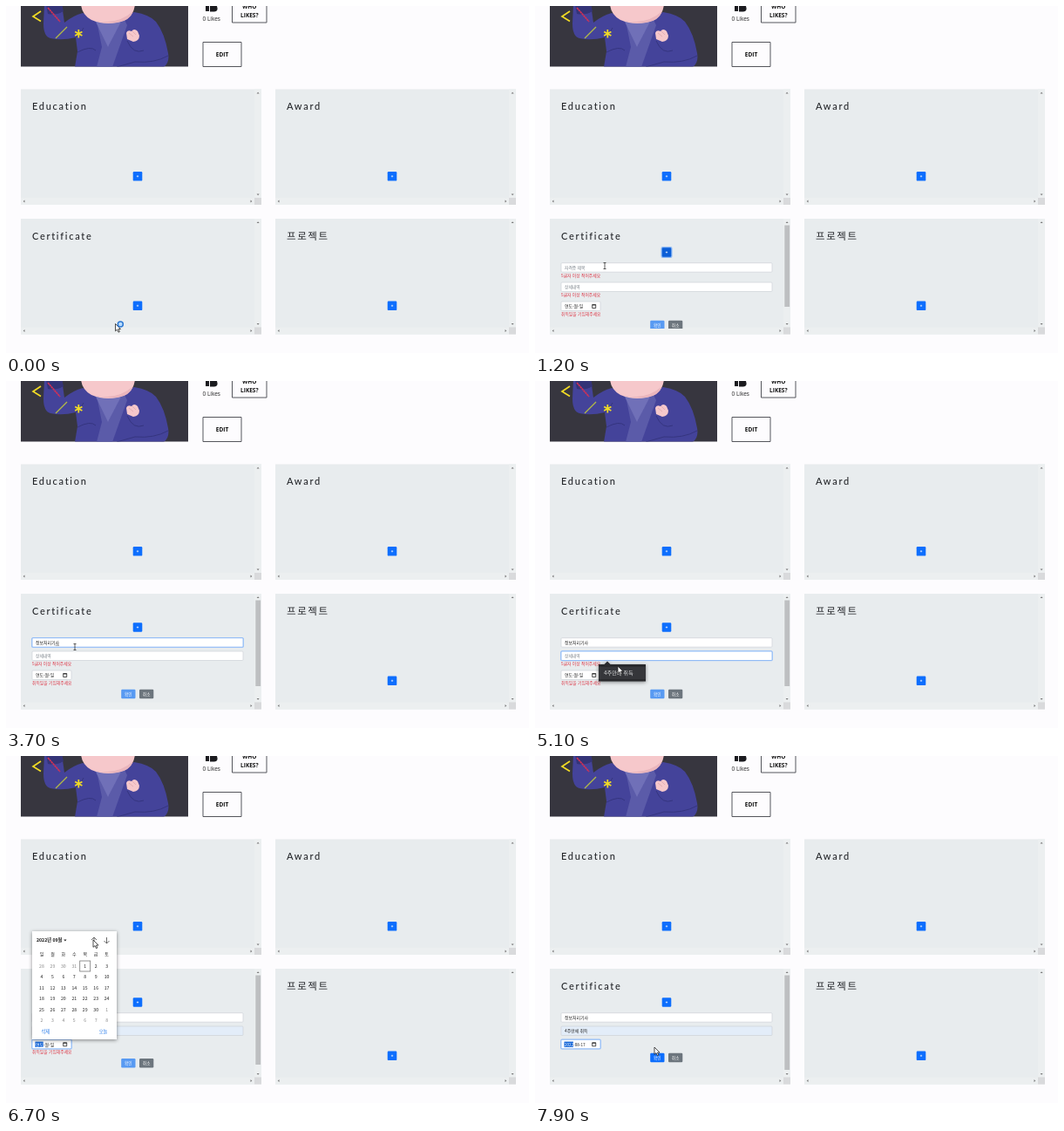
Write an HTML page that moves like this. It is 600x398 px and loops after 8 s.

```html
<!DOCTYPE html>
<html lang="ko">
<head>
<meta charset="utf-8">
<title>Portfolio form</title>
<style>
html, body { margin: 0; width: 100%; height: 100%; overflow: hidden; background: #fdfcfe; }
svg { display: block; width: 600px; height: 398px; }
text { font-family: "Noto Sans CJK KR", "Noto Sans CJK", sans-serif; fill: #222; white-space: pre; }
.title { font: 500 11px Lato, sans-serif; letter-spacing: 1.7px; fill: #25272b; }
.ko { font-size: 11.5px; letter-spacing: 1.6px; }
.ui { font-family: "Open Sans", sans-serif; font-size: 6.5px; }
.bold { font-weight: 700; fill: #111; }
.pop { filter: drop-shadow(0 1px 2px rgba(0,0,0,.45)); }
</style>
</head>
<body>
<svg viewBox="0 0 600 398">
  <defs>
    <clipPath id="photo"><path d="M17 0H209V69.5H17z"/></clipPath>
    <clipPath id="form"><path d="M17 244H286V370H17z"/></clipPath>
    <clipPath id="days"><path d="M30 233.5H127V309H30z"/></clipPath>
  </defs>
  <rect width="600" height="398" fill="#fdfcfe"/>
  <g clip-path="url(#photo)">
    <rect x="17" width="192" height="70" fill="#37363f"/>
    <path d="M44-2L43 20Q43 35 51 37Q64 40 80 36L82 52L79 70H181Q188 65 186 54Q182 31 172 18Q165 10 147 7L118 20L88 8Q77 11 67 19L64-2Z" fill="#44439a"/>
    <path d="M46-2L48 9Q58 11 66 6L64-2Z" fill="#343477"/>
    <path d="M103 12L118 45L134 12L139 22L122 70H104L110 47Z" fill="#5b5ba9"/>
    <path d="M101 14L117 47L134 14Z" fill="#7070b8"/>
    <path d="M80 36Q86 32 89 25M82 53Q97 45 103 51M186 57Q170 66 148 64L127 70M139 40Q146 56 158 51" fill="none" stroke="#35357f"/>
    <path d="M86-2Q87 10 98 16Q117 24 137 16Q147 10 148-2Z" fill="#f6c8cb"/>
    <path d="M88 5Q95 15 109 18Q130 20 146 6Q142 17 128 19Q101 22 88 5Z" fill="#eab5bc"/>
    <path d="M138 31Q139 27 144 29Q147 25 151 29L153 34Q153 40 146 41L139 38Z" fill="#f6c8cb"/>
    <path d="M141 31L146 35M145 29L149 33" stroke="#dca5ad" stroke-width=".7"/>
    <g fill="none" stroke-width="1.7">
      <path d="M40 6L31 12L40 17.500M83.300 27V36.500M79.200 29.400L87.400 34M87.400 29.400L79.200 34" stroke="#f2dc24"/>
      <path d="M48 2L62 18" stroke="#cf3157" stroke-dasharray="2.500 .4"/>
      <path d="M57 37L70 24" stroke="#b3ba45" stroke-width="1.300"/>
    </g>
  </g>
  <path d="M229 0H233V6H229zM234 0H242Q244 6 239 6.500H234z" fill="#1b1b1f"/>
  <text class="ui" x="225.500" y="16.500">0 Likes</text>
  <g fill="none" stroke="#55565c"><path d="M259.500-2V19H299V-2M226 41.500H270V69.500H226z"/></g>
  <g class="ui bold" text-anchor="middle">
    <text class="ui bold" x="279.300" y="3">WHO</text>
    <text class="ui bold" x="279.300" y="13">LIKES?</text>
    <text class="ui bold" x="248" y="58">EDIT</text>
  </g>
  <g id="panels"></g>
  <g id="live"></g>
</svg>
<script>
const LOOP = 8000, STEP = 100;
const $ = id => document.getElementById(id);
const box = (x, y, w, h, fill, more = '') =>
  `<rect x="${x}" y="${y}" width="${w}" height="${h}" fill="${fill}" ${more}/>`;
const txt = (x, y, s, size = 4.9, fill = '#222', more = '') =>
  `<text x="${x}" y="${y}" style="font-size:${size}px;fill:${fill}" ${more}>${s}</text>`;
const mid = 'text-anchor="middle"';
const line = (d, color, w = 1) => `<path d="${d}" fill="none" stroke="${color}" stroke-width="${w}"/>`;

function plus(x, y, focus) {
  const ring = focus ? box(x - 6.5, y - 6.5, 13, 13, '#8db9f5', 'rx="2"') : '';
  return ring + box(x - 5.3, y - 5.3, 10.6, 10.6, focus ? '#0b5ed7' : '#0d6efd', 'rx="1.2"') +
    line(`M${x - 1.2} ${y}h2.4M${x} ${y - 1.2}v2.4`, '#fff', .6);
}

function panel(x, y, title, cls) {
  const tip = (a, b, d) => `<path d="M${x + a} ${y + b}${d}z" fill="#777"/>`;
  return box(x, y, 276, 132.5, '#e8ecee') +
    box(x + 268, y, 8, 124.5, '#eceff0') + box(x, y + 124.5, 268, 8, '#eceff0') +
    box(x + 268, y + 124.5, 8, 8, '#d9dadc') +
    tip(270.6, 5, 'h3l-1.5 -1.8') + tip(270.6, 120, 'h3l-1.5 1.8') +
    tip(4.5, 127, 'v3l-1.8 -1.5') + tip(263.5, 127, 'v3l1.8 -1.5') +
    `<text class="title ${cls}" x="${x + 13}" y="${y + 23.5}">${title}</text>`;
}

$('panels').innerHTML =
  panel(17, 95.5, 'Education', '') + panel(309, 95.5, 'Award', '') +
  panel(17, 244, 'Certificate', '') + panel(309, 244, '프로젝트', 'ko') +
  plus(151, 195.3) + plus(443, 195.3) + plus(443, 343.8);

const OPEN = 1000, FOCUS1 = 1500, NAMED = 2800, FOCUS2 = 4500, FILLED = 5400,
  PICKER = 6000, MONTH = 7000, PICKED = 7500;

// time, x, y of the pointer tip
const path = [[0, 125.5, 364.5], [300, 130, 361], [700, 149, 345], [1000, 148, 343],
  [1200, 80, 298], [1500, 80, 299], [2000, 80, 299], [2300, 79, 305], [4100, 79, 305],
  [4400, 83, 315], [4700, 83, 315], [5100, 95, 327], [5400, 96, 329], [5900, 68, 329],
  [6200, 68, 329], [6700, 100, 211], [7000, 101, 211], [7200, 83, 260], [7500, 83, 262],
  [7900, 137, 334], [8000, 138, 336]];

function pointer(t) {
  const i = path.findIndex(p => p[0] > t);
  const [a, b] = [path[i - 1], path[i]];
  const p = (t - a[0]) / (b[0] - a[0]), e = p * p * (3 - 2 * p);
  return [a[1] + (b[1] - a[1]) * e, a[2] + (b[2] - a[2]) * e];
}

function cursor(t) {
  const [x, y] = pointer(t);
  let s;
  if (t >= 1200 && t < 4800) {
    s = line('M-1.5 -3.5H1.5M0 -3.5V3.5M-1.5 3.5H1.5', '#333', .8);
  } else {
    s = '<path d="M0 0V8.300L2 6.600L3.500 9.700L4.900 9L3.400 6.100H6Z" fill="#fff" stroke="#222" stroke-width=".8"/>';
    if (t < 300) s += '<circle cx="5.800" cy=".5" r="3" fill="#b9dcff" stroke="#2d78d2" stroke-width="1.500"/>';
  }
  return `<g transform="translate(${x.toFixed(2)} ${y.toFixed(2)})">${s}</g>`;
}

// Hangul as it is composed key by key
const keys = ['ㅈ', '저', '정', '정ㅂ', '정보', '정보ㅊ', '정보처', '정보철', '정보처리', '정보처릭', '정보처리기', '정보처리깃', '정보처리기사'];
const typed = t => t < 1900 ? '' : keys[Math.min(keys.length - 1, Math.floor((t - 1900) / 100))];

function field(x, y, w, focus, fill = '#fff') {
  return (focus ? box(x - .8, y - .8, w + 1.6, 12.1, '#a9cbfa', 'rx="1.5"') : '') +
    box(x, y, w, 10.5, fill, `rx="1" stroke="${focus ? '#75a9f2' : '#cdd2d7'}" stroke-width=".7"`);
}

function dateField(t, y) {
  const focus = t >= PICKER;
  const parts = t < MONTH ? ['연도', '-월-일'] : ['2022', t < PICKED ? '-08-01' : '-08-17'];
  const w = t < MONTH ? 9.2 : 10.4;
  return field(30, y, 45, focus) +
    (focus ? box(33.5, y + 2.3, w, 6.3, '#1667d9') : '') +
    txt(34, y + 7.2, parts[0], t < MONTH ? 4.9 : 4.6, focus ? '#fff' : '#222') +
    txt(33.7 + w, y + 7.2, parts[1], t < MONTH ? 4.9 : 4.6) +
    line(`M65.700 ${y + 3.500}h4v4h-4zM65.700 ${y + 4}h4`, '#222', .8);
}

function button(x, y, label, fill) {
  return box(x, y - 5.2, 16.3, 10.4, fill, 'rx="1.2"') + txt(x + 8.15, y + 1.8, label, 4.7, '#fff', mid);
}

function form(t) {
  const named = t >= NAMED, filled = t >= FILLED, dated = t >= MONTH;
  const y2 = named ? 310 : 317, y3 = !named ? 339 : filled ? 325.3 : 332;
  const yb = !named ? 366 : !filled ? 359 : dated ? 346 : 352.3;
  const thumb = !named ? 345 : !filled ? 350 : dated ? 360 : 354;
  const error = (y, s) => txt(30, y, s, 4.8, '#dc3545');
  const short = '5글자 이상 적어주세요';
  const on1 = t >= FOCUS1 && t < FOCUS2, on2 = t >= FOCUS2 && t < PICKER;
  const name = typed(t), end = 34 + name.length * 4.51;
  let s = plus(151, 282.5, t < FOCUS1) + field(30, 294.7, 242, on1);
  s += name ? txt(34, 301.9, name) : txt(34, 301.9, '자격증 제목', 4.8, '#777f87');
  if (on1 && name) s += line(`M${end - 4.5} 303.200H${end}`, '#333', .5);
  if (on1 && t % 1000 < 500) s += line(`M${end + .3} 297.500V302.700`, '#222', .5);
  if (!named) s += error(311, short);
  s += field(30, y2, 242, on2, filled ? '#e3edf9' : '#fff');
  s += filled ? txt(34, y2 + 7.2, '4주만에 취득') : txt(34, y2 + 7.2, '상세내역', 4.8, '#777f87');
  if (!filled) s += error(y2 + 16, short);
  s += dateField(t, y3);
  if (!dated) s += error(y3 + 15.6, '취득일을 기입해주세요');
  s += button(132.2, yb, '확인', dated ? '#0d6efd' : '#589af2') + button(153, yb, '취소', '#6c757d');
  return `<g clip-path="url(#form)">${s}</g>` + box(286.3, 251.5, 5.8, thumb - 251.5, '#bdbfc1');
}

function suggestion(t) {
  const hover = t >= 5000;
  return '<g class="pop"><path d="M73 325H79.500L83 321.500L86.500 325H127V344.500H73z" fill="#292a2d"/></g>' +
    (hover ? box(73, 328, 54, 14, '#35363a') : '') + txt(79, 337, '4주만에 취득', 6.2, '#dfe0e2');
}

const colX = c => 41 + c * 12.43;

function calendar(t) {
  if (t < PICKER + 200) {
    const a = t < PICKER + 100 ? .12 : .35;
    return `<g class="pop">${box(30, 201, 97, 124, '#fff', `fill-opacity="${a}" stroke="#aaa" stroke-width=".8"`)}</g>`;
  }
  const aug = t >= MONTH, month = aug ? 7 : 8;
  const p = Math.min(1, Math.max(0, (t - MONTH) / 400));
  const top = 4 * (1 - p) ** 2;
  const [px, py] = pointer(t);
  let days = '';
  for (let r = Math.floor(top) - 1; r < top + 7; r++) for (let c = 0; c < 7; c++) {
    const d = new Date(2022, 6, 31 + r * 7 + c), m = d.getMonth(), n = d.getDate();
    const x = colX(c), y = 241 + (r - top) * 12.4;
    const chosen = aug && m === 7 && n === 1;
    const over = Math.abs(px - x) < 6.2 && Math.abs(py + 1 - y) < 6.2 && py > 233;
    if (chosen || over) days += box(x - 6.2, y - 6.2, 12.4, 12.4, chosen ? '#1a73e8' : '#a9cdf5');
    if (m === 8 && n === 1) days += box(x - 6, y - 6, 12, 12, 'none', 'stroke="#777" stroke-width=".8"');
    days += txt(x, y + 1.9, n, 5.2, chosen ? '#fff' : m === month ? '#222' : '#888', mid);
  }
  const week = [...'일월화수목금토'].map((d, c) => txt(colX(c), 228.8, d, 5, '#222', mid)).join('');
  return `<g class="pop">${box(30, 201, 97, 124, '#fff')}</g>` +
    txt(35, 213.2, `2022년 0${month + 1}월`, 5.2, '#111', 'font-weight="700"') +
    '<path d="M66.300 210.500h3.200l-1.600 2z" fill="#222"/>' +
    line('M101 215V208M98 211L101 208L104 211M115.500 208V215M112.500 212L115.500 215L118.500 212', '#444', .8) +
    week + `<g clip-path="url(#days)">${days}</g>` +
    txt(45.3, 318.2, '삭제', 5.2, '#1a73e8', mid) + txt(111.5, 318.2, '오늘', 5.2, '#1a73e8', mid);
}

let shown = -1;
function draw(now) {
  const t = Math.floor(now % LOOP / STEP) * STEP;
  if (t !== shown) {
    shown = t;
    let s = t < OPEN ? plus(151, 343.8, t >= 900) : form(t);
    if (t >= 4700 && t < FILLED) s += suggestion(t);
    if (t >= PICKER && t < PICKED) s += calendar(t);
    $('live').innerHTML = s + cursor(t);
  }
  requestAnimationFrame(draw);
}
draw(performance.now());
</script>
</body>
</html>
```
